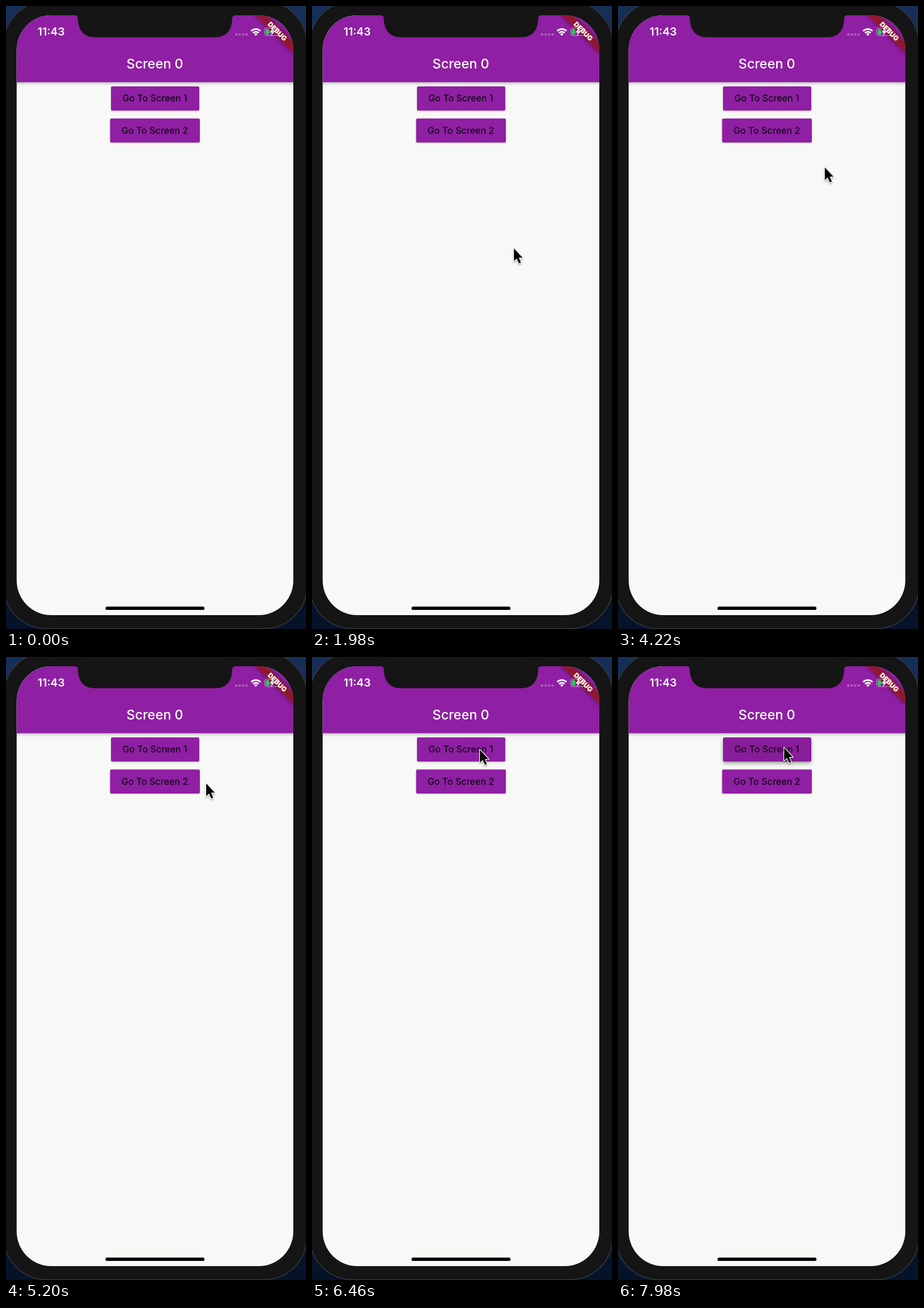
Animation, 520 px wide and 1077 px high, one loop 8 s. Source, as an HTML page:

```html
<!DOCTYPE html>
<html lang="en">
<head>
<meta charset="utf-8">
<title>Screen 0</title>
<style>
  html, body { margin: 0; width: 100%; height: 100%; overflow: hidden; background: #06152c; }
  svg { display: block; width: 100vw; height: 100vh; }
  text { font-family: Inter, sans-serif; text-anchor: middle; }
  .title { font-size: 23px; font-weight: 500; fill: #fff; }
  .clock { font-size: 19px; font-weight: 600; fill: #fff; }
  .label { font-size: 15.6px; font-weight: 500; letter-spacing: .1px; fill: #000; fill-opacity: .87; }
  .debug { font-size: 11.8px; font-weight: 900; fill: #fff; }
  .purple { fill: #8f1fa3; }
  .bar { filter: drop-shadow(0 2px 2.4px rgba(0, 0, 0, .28)); }
  .raised { filter: drop-shadow(0 1.5px 1.5px rgba(0, 0, 0, .24)); }
  .pressed { filter: drop-shadow(0 3px 3px rgba(0, 0, 0, .38)); fill: #881d9b; }
</style>
</head>
<body>
<svg viewBox="0 0 520 1077">
  <defs>
    <linearGradient id="desktop" x2="0" y2="1">
      <stop offset="0" stop-color="#172f57"/>
      <stop offset="1" stop-color="#051329"/>
    </linearGradient>
    <clipPath id="screen"><rect x="18.5" y="16" width="479.5" height="1037" rx="60"/></clipPath>
    <filter id="blur" x="-30%" y="-100%" width="160%" height="300%"><feGaussianBlur stdDeviation="3.4"/></filter>
  </defs>

  <rect width="520" height="1077" fill="url(#desktop)"/>
  <rect x="-4" y="-8" width="525.5" height="1084.5" rx="74" fill="#151515" stroke="#343940" stroke-width="1.5"/>

  <g clip-path="url(#screen)">
    <rect x="18" y="16" width="481" height="1038" fill="#f8f9f6"/>
    <rect class="purple bar" x="10" y="6" width="500" height="125.7"/>

    <rect id="button" class="purple raised" x="182" y="139" width="153" height="41.7" rx="2.3"/>
    <rect class="purple raised" x="180.5" y="194.5" width="155.5" height="41.5" rx="2.3"/>
    <text class="label" x="258" y="165">Go To Screen 1</text>
    <text class="label" x="258" y="220.5">Go To Screen 2</text>
    <text class="title" x="258" y="108">Screen 0</text>

    <g transform="translate(498 16) rotate(45)">
      <rect x="-46.3" y="32.4" width="92.6" height="13.9" filter="url(#blur)" opacity=".5"/>
      <rect x="-46.3" y="32.4" width="92.6" height="13.9" fill="#b71c1c" fill-opacity=".63"/>
      <text class="debug" x="0" y="43.4">DEBUG</text>
    </g>

    <text class="clock" x="78.3" y="51.4">11:43</text>
    <g fill="#fff" fill-opacity=".3">
      <circle cx="399" cy="49.3" r="2.1"/><circle cx="405" cy="49.3" r="2.1"/>
      <circle cx="411" cy="49.3" r="2.1"/><circle cx="417" cy="49.3" r="2.1"/>
    </g>
    <g fill="none" stroke="#fff" stroke-width="2.6">
      <path d="M424.9 43.2a11.6 11.6 0 0 1 16.2 0"/>
      <path d="M428 46.7a7 7 0 0 1 10 0"/>
      <path d="M430.2 48.6a4 4 0 0 1 5.6 0L433 51.8Z" fill="#fff" stroke="none"/>
    </g>
    <rect x="448.5" y="38.2" width="24.5" height="13" rx="3.6" fill="none" stroke="#fff" stroke-opacity=".45" stroke-width="1.2"/>
    <rect x="450.3" y="40" width="6" height="9.4" rx="1.6" fill="#35c759"/>
    <path d="M463.3 37.8L456.8 45.8H460.8L459.2 51.8L465.6 43.6H461.6Z" fill="#fff"/>

    <path d="M119 10V16Q124.5 16 124.5 22C125 42 135 54 154 54H363C382 54 391.5 42 392 22Q392 16 398 16V10Z" fill="#151515"/>
    <rect x="172.5" y="1038.3" width="171.5" height="5.8" rx="2.9"/>
  </g>

  <path id="cursor" d="M0 0V22L4.9 17.4L8.7 26L12.2 24.5L8.5 16H15Z"
    stroke="#fff" stroke-width="2.4" stroke-linejoin="round" paint-order="stroke"
    style="filter: drop-shadow(0 2px 1.5px rgba(0, 0, 0, .3))"/>
</svg>
<script>
  const LOOP = 8000, PRESS = 7850;
  const cursor = document.getElementById('cursor');
  const button = document.getElementById('button');

  // Each stop: time in ms, then the cursor tip.
  const stops = [
    [1250, 440, 1090], [1900, 350, 419], [2000, 350, 419],
    [2550, 358.5, 279], [4500, 358.5, 279], [5150, 347, 218.5],
    [5300, 347, 218.5], [6250, 291, 160.5], [6700, 291, 160.5],
    [7500, 288, 157], [LOOP, 288, 157]
  ];
  const ease = u => u * u * (3 - 2 * u);

  function cursorAt(time) {
    if (time <= stops[0][0]) return stops[0].slice(1);
    const next = stops.findIndex(stop => stop[0] >= time);
    const [t0, x0, y0] = stops[next - 1], [t1, x1, y1] = stops[next];
    const u = ease((time - t0) / (t1 - t0));
    return [x0 + (x1 - x0) * u, y0 + (y1 - y0) * u];
  }

  function draw() {
    const time = performance.now() % LOOP;
    cursor.setAttribute('transform', `translate(${cursorAt(time)})`);
    button.setAttribute('class', time < PRESS ? 'purple raised' : 'pressed');
    requestAnimationFrame(draw);
  }
  draw();
</script>
</body>
</html>
```
